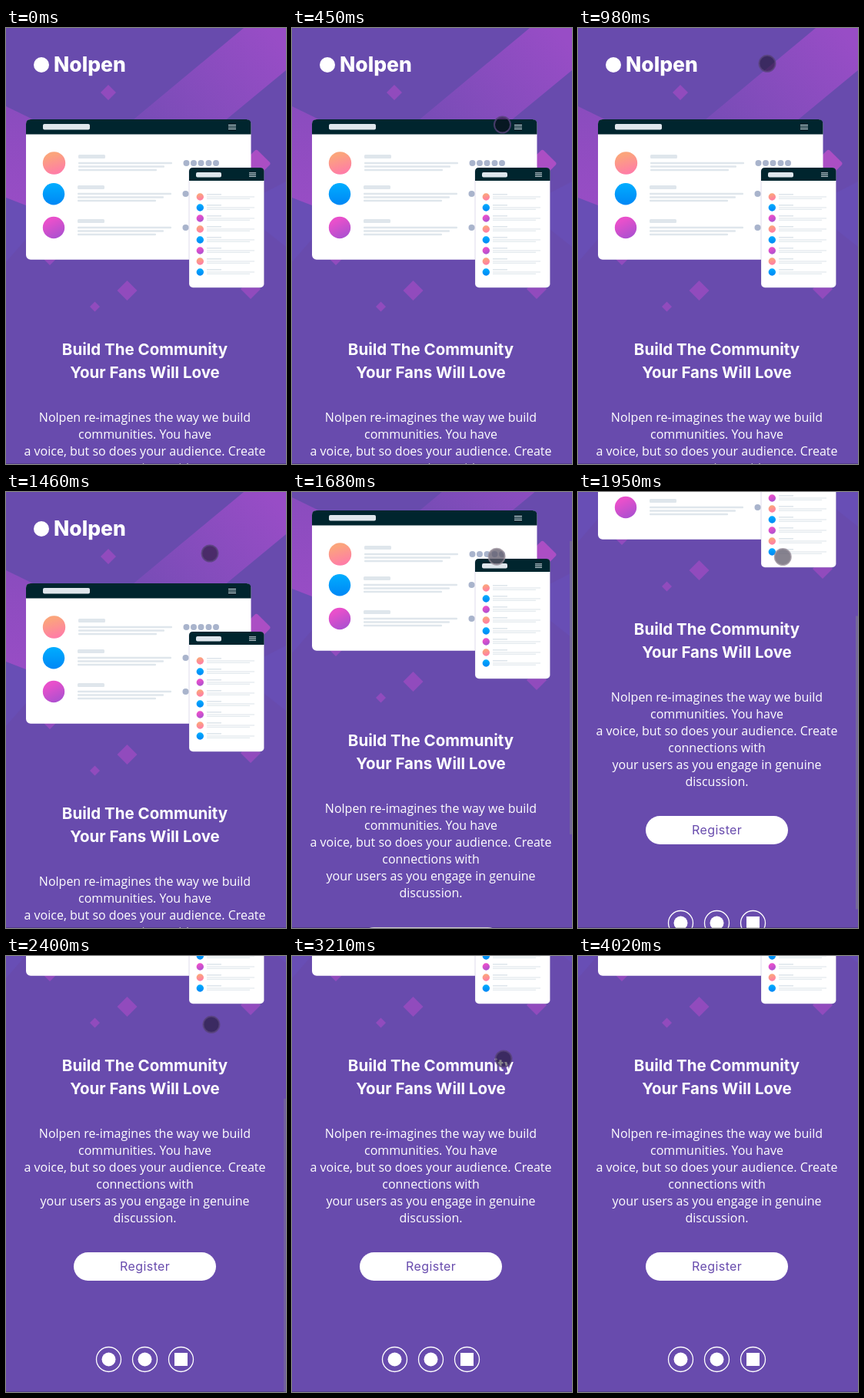
Write an HTML page that moves like this. It is 364x568 px and loops after 4370 ms.

```html
<!DOCTYPE html>
<html lang="en">
<head>
<meta charset="utf-8">
<title>Landing page scroll</title>
<style>
  html, body { margin: 0; width: 100%; height: 100%; overflow: hidden; background: #684bad; }
  svg { display: block; width: 100%; height: 100%; }
  text { fill: #fff; }
  .brand, .title, .label { font-family: Inter, sans-serif; }
  .brand { font-size: 26.5px; font-weight: 800; }
  .title { font-size: 20.5px; font-weight: 700; text-anchor: middle; }
  .copy { font: 16px "Open Sans", sans-serif; text-anchor: middle; }
  .label { font-size: 16px; letter-spacing: .4px; text-anchor: middle; fill: #684bad; }
  .diamond { fill: #914bbd; }
  .bar { fill: #00252e; }
  .pale { fill: #dfe6ec; }
  .dots { fill: #a9b4cc; }
  .ring { fill: none; stroke: #fff; stroke-width: 1.3; }
  .icon { fill: #fff; }
  #touch { fill: rgba(14, 10, 22, .5); stroke: rgba(88, 68, 122, .8); stroke-width: 2; }
  #touch.down { fill: rgba(95, 90, 105, .75); stroke: rgba(150, 140, 152, .75); }
</style>
</head>
<body>
<svg viewBox="0 0 364 568">
  <defs>
    <linearGradient id="beam" gradientUnits="userSpaceOnUse" x1="350" y1="10" x2="190" y2="140">
      <stop stop-color="#984dc6"/><stop offset="1" stop-color="#784cb6"/>
    </linearGradient>
    <linearGradient id="wedge" x1="0" y1="0" x2="0" y2="1">
      <stop stop-color="#8a4cbe"/><stop offset="1" stop-color="#9a4dc6"/>
    </linearGradient>
    <linearGradient id="peach" x1=".3" y1="0" x2=".6" y2="1">
      <stop offset=".15" stop-color="#fba47c"/><stop offset="1" stop-color="#ff7ba9"/>
    </linearGradient>
    <linearGradient id="blue" x1="0" y1="0" x2="0" y2="1">
      <stop stop-color="#00adff"/><stop offset="1" stop-color="#0087f5"/>
    </linearGradient>
    <linearGradient id="pink" x1=".2" y1="0" x2=".7" y2="1">
      <stop offset=".2" stop-color="#e850cb"/><stop offset="1" stop-color="#aa50d0"/>
    </linearGradient>
    <g id="post" class="pale">
      <rect y="-11" width="35" height="5" rx="1.5"/>
      <rect y="-1.2" width="122" height="2.4" rx="1"/>
      <rect y="3.3" width="112" height="2.4" rx="1"/>
      <rect y="7.8" width="102" height="2.4" rx="1"/>
    </g>
    <g id="line" class="pale">
      <rect y="-4" width="19" height="1.6"/>
      <rect y="-.6" width="62" height="1.1"/>
      <rect y="1.7" width="56" height="1.1"/>
    </g>
    <path id="menu" d="M0 0h10M0 2.5h10M0 5h10" stroke="#dfe6ec" stroke-width="1.1"/>
  </defs>

  <g id="page">
    <path fill="#684eb5" d="M0 221L26 231V275L0 305ZM335 215L364 200V285L335 262Z"/>
    <path fill="url(#beam)" d="M309 0H364V55L220 174H100Z"/>
    <path fill="url(#wedge)" d="M0 102L80 141V252L0 221Z"/>
    <path class="diamond" d="M133 74l10 10-10 10-10-10zM57 289l10 10-10 10-10-10zM157.500 329l13 13-13 13-13-13zM115.500 356.500l6.500 6.500-6.500 6.500-6.500-6.500zM318 327l13 13-13 13-13-13z"/>
    <rect x="312" y="163.200" width="27" height="27" rx="3" transform="rotate(45 325.500 176.700)" fill="#ab4ec4"/>

    <circle class="icon" cx="46" cy="48" r="10"/>
    <text class="brand" x="62" y="57">Nolpen</text>

    <rect x="26" y="119" width="292.500" height="182.700" rx="6" fill="#fff"/>
    <path class="bar" d="M26 138.500v-13.500q0-6 6-6h280.500q6 0 6 6v13.500z"/>
    <rect class="pale" x="48" y="125" width="61" height="7.500" rx="2"/>
    <use href="#menu" x="289" y="126.500"/>
    <circle cx="62.500" cy="176" r="14.700" fill="url(#peach)"/>
    <circle cx="62" cy="216.300" r="14.200" fill="url(#blue)"/>
    <circle cx="62" cy="260" r="14.200" fill="url(#pink)"/>
    <use href="#post" x="94" y="176"/>
    <use href="#post" x="93" y="216"/>
    <use href="#post" x="93" y="260"/>
    <g class="dots">
      <circle cx="234.500" cy="176" r="4"/><circle cx="244" cy="176" r="4"/>
      <circle cx="253.500" cy="176" r="4"/><circle cx="263.500" cy="176" r="4"/>
      <circle cx="273" cy="176" r="4"/>
      <circle cx="233.500" cy="216" r="4"/><circle cx="233.500" cy="260" r="4"/>
    </g>

    <rect x="238" y="182" width="97.500" height="156.300" rx="5" fill="#fff" stroke="rgba(90, 70, 150, .2)"/>
    <path class="bar" d="M238 199v-12q0-5 5-5h87.500q5 0 5 5v12z"/>
    <rect class="pale" x="247" y="188" width="33" height="6.500" rx="2"/>
    <use href="#menu" transform="translate(316 188.800) scale(.9)"/>
    <g id="feed"></g>

    <text class="title" x="180.500" y="425.500">Build The Community</text>
    <text class="title" x="180.500" y="455.500">Your Fans Will Love</text>
    <g class="copy">
      <text x="180.500" y="513">Nolpen re-imagines the way we build</text>
      <text x="180.500" y="535">communities. You have</text>
      <text x="180.500" y="557">a voice, but so does your audience. Create</text>
      <text x="180.500" y="579">connections with</text>
      <text x="180.500" y="601">your users as you engage in genuine</text>
      <text x="180.500" y="623">discussion.</text>
    </g>

    <rect x="88" y="662" width="185" height="37" rx="18.500" fill="#fff"/>
    <text class="label" x="180.700" y="686">Register</text>

    <circle class="ring" cx="133.500" cy="801.500" r="16"/>
    <circle class="ring" cx="180.500" cy="801.500" r="16"/>
    <circle class="ring" cx="227.500" cy="801.500" r="16"/>
    <circle class="icon" cx="133.500" cy="801.500" r="9"/>
    <circle class="icon" cx="180.500" cy="801.500" r="9"/>
    <rect class="icon" x="219" y="793" width="17" height="17"/>
  </g>

  <rect y="567" width="364" height="1" fill="#000" opacity=".2"/>
  <rect id="thumb" x="361" width="3" height="382" fill="#7d7890"/>
  <circle id="touch" r="10.500"/>
</svg>
<script>
  const LOOP = 4370, START = 100, STEP = 67.4;
  const PAGE_HEIGHT = 844, VIEW_HEIGHT = 568;
  const PRESS = 21, RELEASE = 33, LEAVE = 58;
  const $ = id => document.getElementById(id);

  // Each key: [step, value, ...]
  const touchPath = [
    [0, 351, 560], [1, 338, 425], [2, 318, 305], [3, 297, 215], [4, 283, 160],
    [5, 273.5, 126], [7, 249, 74], [8, 246, 55], [9, 244, 42], [11, 242, 40],
    [18, 256, 62], [19, 262, 74], [20, 265, 80], [21, 266, 84], [33, 266.5, 85],
    [40, 270, 115], [42, 271, 117], [46, 275, 134], [49, 274, 198],
    [51, 265, 245], [53, 275, 345], [55, 305, 475], [57, 328.5, 566]
  ];
  const scrollPath = [[20, 0], [21, 15], [22, 52], [23, 95], [25, 178], [27, 240], [28, 262], [29, 276]];
  const thumbFade = [[20, 0], [21, .6], [33, .6], [37, 0]];

  function sample(keys, step) {
    const next = keys.findIndex(key => key[0] > step);
    if (next === 0) return keys[0].slice(1);
    if (next < 0) return keys[keys.length - 1].slice(1);
    const a = keys[next - 1], b = keys[next];
    const mix = (step - a[0]) / (b[0] - a[0]);
    return a.slice(1).map((v, i) => v + (b[i + 1] - v) * mix);
  }

  const tints = ['peach', 'blue', 'pink'];
  $('feed').innerHTML = Array.from({ length: 8 }, (_, i) => {
    const y = 220 + 14 * i;
    return `<circle cx="252.300" cy="${y}" r="4.700" fill="url(#${tints[i % 3]})"/><use href="#line" x="261" y="${y}"/>`;
  }).join('');

  function draw() {
    const step = Math.floor((performance.now() % LOOP - START) / STEP);
    const [x, y] = sample(touchPath, step);
    const [scroll] = sample(scrollPath, step);
    const touch = $('touch');
    touch.setAttribute('transform', `translate(${x} ${y})`);
    touch.setAttribute('visibility', step >= 0 && step < LEAVE ? 'visible' : 'hidden');
    touch.classList.toggle('down', step >= PRESS && step < RELEASE);
    $('page').setAttribute('transform', `translate(0 ${-scroll})`);
    $('thumb').setAttribute('y', scroll * VIEW_HEIGHT / PAGE_HEIGHT);
    $('thumb').setAttribute('opacity', sample(thumbFade, step)[0]);
    requestAnimationFrame(draw);
  }
  draw();
</script>
</body>
</html>
```
